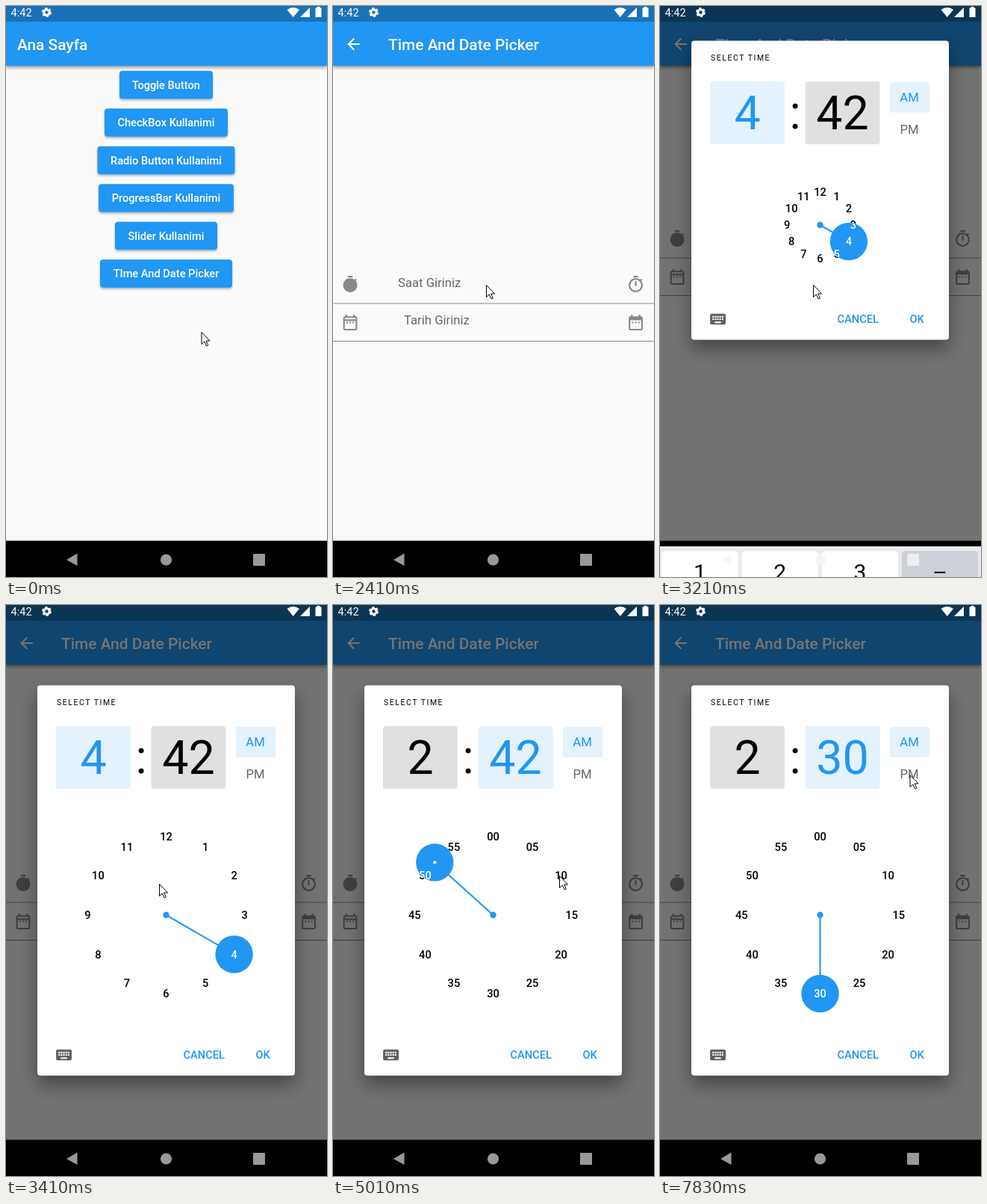
An HTML page for the animation above (8000 ms loop, 430 by 764 pixels).

```html
<!DOCTYPE html>
<html lang="tr">
<head>
<meta charset="utf-8">
<title>Time picker</title>
<style>
html, body { margin: 0; width: 100%; height: 100%; overflow: hidden; background: #000; }
svg { display: block; width: 100%; height: 100%; font-family: Roboto, sans-serif; }
.title { font: 500 20.9px Roboto, sans-serif; fill: #fff; }
.label { font: 500 14.63px Roboto, sans-serif; }
.body { font-size: 16.7px; }
.big { font-size: 62.7px; }
.mid { text-anchor: middle; }
</style>
</head>
<body>
<svg viewBox="0 0 430 764">
  <defs>
    <filter id="low" x="-10%" y="-30%" width="120%" height="180%"><feDropShadow dx="0" dy="1.8" stdDeviation="1.4" flood-opacity=".32"/></filter>
    <filter id="lifted" x="-10%" y="-40%" width="120%" height="220%"><feDropShadow dx="0" dy="4" stdDeviation="3.5" flood-opacity=".36"/></filter>
    <filter id="bar" x="-5%" y="-10%" width="110%" height="150%"><feDropShadow dx="0" dy="2.5" stdDeviation="2.3" flood-opacity=".4"/></filter>
    <filter id="high" x="-20%" y="-20%" width="140%" height="140%"><feDropShadow dx="0" dy="12" stdDeviation="12" flood-opacity=".4"/></filter>
    <clipPath id="inButton"><rect x="126" y="339" width="177" height="38" rx="4"/></clipPath>
    <clipPath id="inKnob"><circle id="knobClip" r="25.2"/></clipPath>
    <path id="arrow" d="M20 11H7.83l5.59-5.59L12 4l-8 8 8 8 1.41-1.41L7.83 13H20z"/>
    <path id="timer" d="M15 1H9v2h6zm-4 13h2V8h-2zm8.03-6.61l1.42-1.42c-.43-.51-.9-.99-1.41-1.41l-1.42 1.42C16.07 4.74 14.12 4 12 4a9 9 0 1 0 7.03 3.39z"/>
    <path id="timerLine" d="M15 1H9v2h6zm-4 13h2V8h-2zm8.03-6.61l1.42-1.42c-.43-.51-.9-.99-1.41-1.41l-1.42 1.42C16.07 4.74 14.12 4 12 4a9 9 0 1 0 7.03 3.39zM12 20a7 7 0 1 1 0-14 7 7 0 0 1 0 14z" fill-rule="evenodd"/>
    <path id="date" d="M9 11H7v2h2zm4 0h-2v2h2zm4 0h-2v2h2zm2-7h-1V2h-2v2H8V2H6v2H5a2 2 0 0 0-2 2v14a2 2 0 0 0 2 2h14a2 2 0 0 0 2-2V6a2 2 0 0 0-2-2zm0 16H5V9h14z" fill-rule="evenodd"/>
    <path id="dateLine" d="M7 11h2v2H7zm4 0h2v2h-2zm4 0h2v2h-2zM19 4h-1V2h-2v2H8V2H6v2H5a2 2 0 0 0-2 2v14a2 2 0 0 0 2 2h14a2 2 0 0 0 2-2V6a2 2 0 0 0-2-2zM5 6h14v2H5zm0 4h14v10H5z" fill-rule="evenodd"/>
    <path id="keys" d="M20 5H4a2 2 0 0 0-2 2v10a2 2 0 0 0 2 2h16a2 2 0 0 0 2-2V7a2 2 0 0 0-2-2zM5 8h2v2H5zm3 0h2v2H8zm3 0h2v2h-2zm3 0h2v2h-2zm3 0h2v2h-2zM5 11h2v2H5zm3 0h2v2H8zm3 0h2v2h-2zm3 0h2v2h-2zm3 0h2v2h-2zM8 15h8v2H8z" fill-rule="evenodd"/>
  </defs>

  <rect width="430" height="764" fill="#fafafa"/>
  <g id="home">
    <rect y="-10" width="430" height="90" fill="#2196f3" filter="url(#bar)"/>
    <text class="title" x="15" y="58.8">Ana Sayfa</text>
    <g id="buttons"></g>
  </g>

  <g id="page">
    <rect y="21" width="430" height="743" fill="#fafafa"/>
    <rect y="-10" width="430" height="90" fill="#2196f3" filter="url(#bar)"/>
    <use href="#arrow" transform="translate(15 38.5) scale(1.045)" fill="#fff"/>
    <text class="title" x="74" y="58.8">Time And Date Picker</text>
    <g id="rows" fill="#888">
      <use href="#timer" transform="translate(10.5 360) scale(1.045)"/>
      <use href="#timerLine" transform="translate(393 360) scale(1.045)"/>
      <use href="#dateLine" transform="translate(10.5 411) scale(1.045)"/>
      <use href="#date" transform="translate(393 411) scale(1.045)"/>
      <text class="body" x="87" y="376" fill="#666">Saat Giriniz</text>
      <text class="body" x="95" y="426.3" fill="#666">Tarih Giriniz</text>
      <path d="M0 398h430M0 448.5h430" stroke="#888"/>
    </g>
  </g>

  <rect width="430" height="21" fill-opacity=".25"/>
  <rect id="dim" width="430" height="716"/>
  <g fill="#fff">
    <text x="6.5" y="14.2" font-size="14.6">4:42</text>
    <g transform="translate(54.5 8.5)" fill="none" stroke="#fff">
      <circle r="3.7" stroke-width="3"/>
      <circle r="5.5" stroke-width="2" stroke-dasharray="3.1 2.66"/>
    </g>
    <path d="M376.5 5Q384.700 -1 393 5L384.700 15z"/>
    <path d="M394 15L407 2V15z"/>
    <path d="M416.500 1h4v1.500h2V15h-8V2.500h2z"/>
  </g>

  <g id="dialog">
    <rect id="card" x="42" width="345" rx="4" fill="#fff" filter="url(#high)"/>
    <g id="head">
      <text x="68" y="133.7" font-size="10.45" letter-spacing="1.57">SELECT TIME</text>
      <rect id="hourBox" x="67" y="162" width="100" height="84" rx="4"/>
      <text id="hour" class="big mid" x="117" y="225.500"></text>
      <text class="big mid" x="181" y="224.500">:</text>
      <rect id="minBox" x="194.500" y="162" width="100" height="84" rx="4"/>
      <text id="min" class="big mid" x="244.500" y="225.500"></text>
      <rect x="308" y="163" width="53" height="40.500" rx="2" fill="#e3f2fd"/>
      <text class="body mid" x="334" y="188.500" fill="#2196f3">AM</text>
      <text class="body mid" x="334" y="231.500" fill="#666">PM</text>
    </g>
    <g id="dial" class="label mid">
      <g id="dark"></g>
      <g fill="#2196f3">
        <line id="hand" stroke="#2196f3" stroke-width="2.1"/>
        <circle r="4.2"/>
        <circle id="knob" r="25.2"/>
      </g>
      <circle id="dot" r="2.1" fill="#fff"/>
      <g id="light" fill="#fff" clip-path="url(#inKnob)"></g>
    </g>
    <g id="foot" class="label" fill="#2196f3">
      <use href="#keys" transform="translate(65 589.500) scale(1.045)" fill="#616161"/>
      <text x="237.500" y="607">CANCEL</text>
      <text x="334.500" y="607">OK</text>
    </g>
  </g>

  <rect y="715.500" width="430" height="49"/>
  <g id="keyboard" font-size="30" class="mid">
    <rect y="723" width="430" height="41" fill="#e8eaed"/>
  </g>
  <g id="nav" fill="#999">
    <path d="M81 741L95.500 732.500V749z"/>
    <circle cx="214.500" cy="741" r="7.600"/>
    <rect x="331" y="733" width="16" height="16" rx="1"/>
  </g>
  <path id="cursor" d="M.5.5v16l3.800-3.600 2.700 6 2.300-1-2.700-5.900h5z" fill="#fff" stroke="#000" stroke-linejoin="round"/>
</svg>
<script>
const LOOP = 8000, BLUE = '#2196f3', PALE = '#e3f2fd', GREY = '#e0e0e0';
const $ = id => document.getElementById(id);
const set = (el, attrs) => { for (const k in attrs) el.setAttribute(k, attrs[k]); };
const add = (parent, tag, attrs, text = '') => {
  const el = document.createElementNS('http://www.w3.org/2000/svg', tag);
  set(el, attrs);
  el.textContent = text;
  return parent.appendChild(el);
};
const show = (id, on) => { $(id).style.display = on ? '' : 'none'; };

// Latest entry whose time has passed
const at = (track, t) => track.filter(k => k[0] <= t).pop();

const pointer = [
  [0, 261.500, 436], [390, 257, 414], [590, 250, 380], [790, 246, 362],
  [2210, 222, 368], [2410, 205, 373],
  [3810, 222, 384], [4010, 252, 389], [4210, 284, 380],
  [4410, 306, 362], [4610, 312, 351], [4810, 303, 362],
  [5630, 298, 392], [5830, 285, 438], [6030, 262, 482],
  [6230, 236, 512], [6430, 222, 526], [6630, 216, 518],
  [7230, 248, 470], [7430, 318, 350], [7630, 347, 252], [7830, 334.500, 227]
];
// Time, angle of the hand in degrees clockwise from twelve
const handTrack = [[0, 120], [5010, 312], [5230, 252], [6830, 180]];

const buttons = [
  ['Toggle Button', 125], ['CheckBox Kullanimi', 165], ['Radio Button Kullanimi', 184],
  ['ProgressBar Kullanimi', 181], ['Slider Kullanimi', 137], ['TIme And Date Picker', 177]
].map(([text, w], i) => {
  const y = 86.700 + 50.500 * i;
  const box = add($('buttons'), 'rect', { x: 214.500 - w / 2, y, width: w, height: 37.600, rx: 4, fill: BLUE, filter: 'url(#low)' });
  return { box, text, y };
});
const pressed = buttons[5].box;
const ripple = add($('buttons'), 'circle', { cx: 245, cy: 370, fill: '#fff', 'fill-opacity': .2, 'clip-path': 'url(#inButton)' });
buttons.forEach(b => add($('buttons'), 'text', { class: 'label mid', x: 214.500, y: b.y + 24.100, fill: '#fff' }, b.text));

['1', '2', '3', '–'].forEach((key, i) => {
  const x = 2.500 + 107.200 * i;
  add($('keyboard'), 'rect', { x, y: 729, width: 102, height: 45, rx: 5, fill: i < 3 ? '#fff' : '#cdd0d8' });
  add($('keyboard'), 'text', { x: x + 51, y: 768, fill: '#111' }, key);
});

const numbers = ['dark', 'light'].map(id => Array.from({ length: 12 }, () => add($(id), 'text', {})));

function drawDial(t, cy, radius) {
  const minutes = t >= 5010, angle = at(handTrack, t)[1];
  const polar = deg => [radius * Math.sin(deg * Math.PI / 180), -radius * Math.cos(deg * Math.PI / 180)];
  const [x, y] = polar(angle);
  set($('dial'), { transform: `translate(214.500 ${cy})` });
  set($('hand'), { x2: x, y2: y });
  for (const id of ['knob', 'knobClip', 'dot']) set($(id), { cx: x, cy: y });
  show('dot', angle % 30);
  numbers.forEach(ring => ring.forEach((el, i) => {
    const [nx, ny] = polar(i * 30);
    set(el, { x: nx, y: ny + 5.200 });
    el.textContent = minutes ? String(i * 5).padStart(2, '0') : i || 12;
  }));
}

function drawDialog(t) {
  const squeezed = t >= 3210 && t < 3410, fading = t < 3210;
  const minutes = t >= 5010;
  show('dialog', t >= 3010);
  show('keyboard', squeezed);
  set($('nav'), squeezed ? { fill: '#f4f5f6', opacity: .8 } : { fill: '#999', opacity: 1 });
  set($('rows'), { transform: `translate(0 ${squeezed ? -61 : 0})` });
  set($('dim'), { opacity: t < 3010 ? 0 : fading ? .25 : .54 });
  set($('dialog'), { opacity: fading ? .35 : 1 });
  set($('card'), squeezed ? { y: 46.500, height: 400 } : { y: 107.500, height: 522 });
  set($('head'), { transform: `translate(0 ${squeezed ? -61 : 0})` });
  set($('foot'), { transform: `translate(0 ${squeezed ? -183 : 0})` });
  set($('hourBox'), { fill: minutes ? GREY : PALE });
  set($('minBox'), { fill: minutes ? PALE : GREY });
  set($('hour'), { fill: minutes ? '#000' : BLUE });
  set($('min'), { fill: minutes ? BLUE : '#000' });
  $('hour').textContent = minutes ? 2 : 4;
  $('min').textContent = t < 6830 ? 42 : 30;
  drawDial(t, squeezed ? 293 : 414.800, squeezed ? 44.300 : 105.200);
}

function draw(t) {
  const down = t >= 1190 && t < 1810, entering = t >= 1610 && t < 1810;
  set(pressed, { fill: down ? '#339ef4' : BLUE, filter: down ? 'url(#lifted)' : 'url(#low)' });
  set(ripple, { r: down ? (t < 1410 ? 11 : 31) : 0 });
  show('page', t >= 1610);
  set($('page'), { opacity: entering ? .6 : 1, transform: `translate(0 ${entering ? 24 : 0})` });
  drawDialog(t);
  const [, x, y] = at(pointer, t);
  set($('cursor'), { transform: `translate(${x} ${y})` });
}

const start = performance.now();
function tick() {
  draw((performance.now() - start) % LOOP);
  requestAnimationFrame(tick);
}
tick();
</script>
</body>
</html>
```
